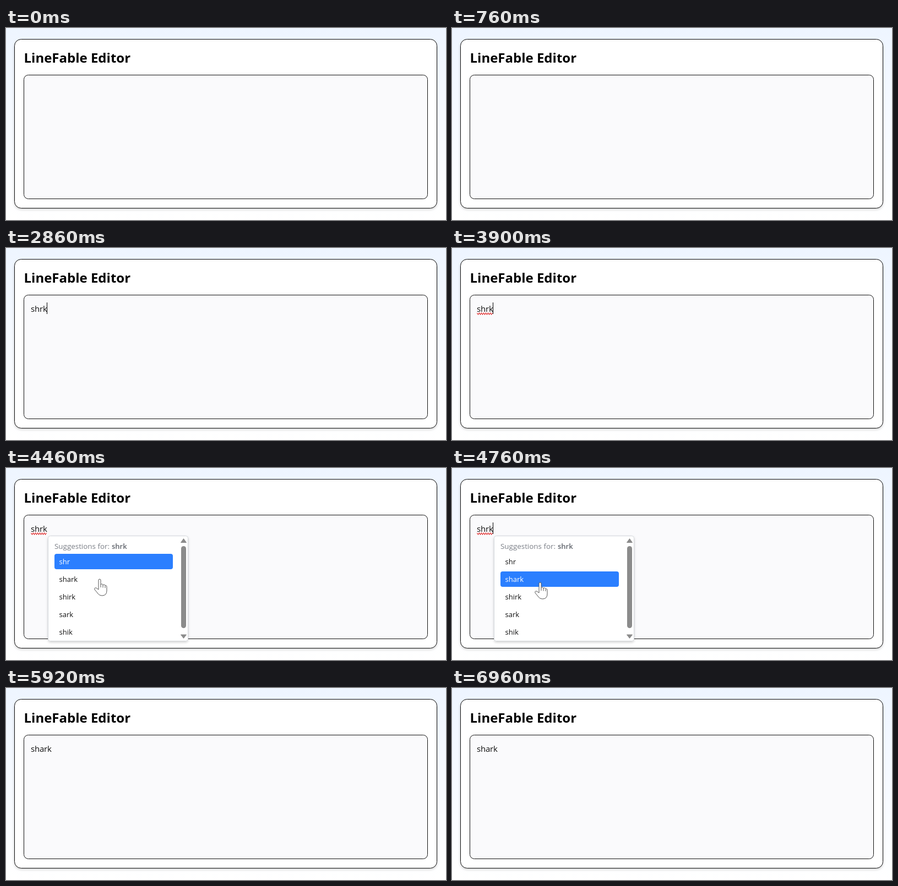
Write an HTML page that moves like this. It is 799 px wide and 349 px high and loops after 7060 ms.

```html
<!DOCTYPE html>
<html lang="en">
<head>
<meta charset="utf-8">
<title>Editor</title>
<style>
  html, body { margin: 0; width: 100%; height: 100%; overflow: hidden; background: #fff; }
  svg { display: block; width: 799px; height: 349px; font-family: "Open Sans", "Noto Sans", sans-serif; }
  .title { font-size: 24px; font-weight: 700; }
  .typed { font-size: 15px; letter-spacing: -.2px; fill: #111; }
  .head { font-size: 13.4px; fill: #7b7f87; }
  .word { font-size: 13px; font-weight: 600; fill: #62666e; }
  .item { font-size: 13px; fill: #111; }
  .cursor { fill: #fff; stroke: #222; stroke-linejoin: round; }
</style>
</head>
<body>
<svg viewBox="0 0 799 349">
  <defs>
    <linearGradient id="sky" x2="0" y2="1">
      <stop stop-color="#eef5ff"/><stop offset="1" stop-color="#fff"/>
    </linearGradient>
    <filter id="soft" x="-5%" y="-5%" width="110%" height="115%">
      <feDropShadow dx="0" dy="2" stdDeviation="2" flood-opacity=".18"/>
    </filter>
  </defs>
  <rect width="799" height="349" fill="url(#sky)"/>
  <rect x="15.5" y="20.5" width="767" height="307" rx="12" fill="#fff" stroke="#111" filter="url(#soft)"/>
  <text class="title" x="32.5" y="63">LineFable Editor</text>
  <rect x="32.5" y="85.5" width="733" height="225" rx="8" fill="#fafafc" stroke="#111"/>
  <text class="typed" id="typed" x="45" y="116"></text>
  <path id="squiggle" fill="none" stroke="#e02020" stroke-width="1.1"/>
  <rect id="caret" y="99" width="1" height="21" fill="#000"/>

  <g id="menu">
    <rect x="76.5" y="123.5" width="254" height="191" rx="4" fill="#fff" stroke="#d5d8dd" filter="url(#soft)"/>
    <text class="head" x="88" y="147">Suggestions for:</text>
    <text class="word" x="192" y="147">shrk</text>
    <rect id="pick" x="88" width="215" height="28" rx="4" fill="#2b7fff"/>
    <g id="items"></g>
    <g fill="#8b8b8b">
      <rect x="318" y="142" width="9" height="149" rx="4.5"/>
      <path d="M322.5 128.5l5 7h-10zM322.5 309.500l5-6.500h-10z" stroke="#8b8b8b" stroke-linejoin="round"/>
    </g>
  </g>

  <g id="arrow" class="cursor">
    <path d="M.5 .5V22.500L5.500 18L9 26.500L12.500 25L9 17H17Z"/>
  </g>
  <g id="beam" class="cursor">
    <path d="M-3-9H-1L0-8L1-9H3M0-8V8M-3 9H-1L0 8L1 9H3" fill="none"/>
  </g>
  <g id="hand" class="cursor">
    <path d="M-2 2Q-2 0 0 0Q2 0 2 2V10Q5 7 6 11Q9 8 10 12Q13 10.500 13 14.500V21Q13 29.500 5 30Q-1 30-4 25L-9 19Q-10 15-6 16L-2 19ZM2 10V15M6 11V15.500M10 12.500V16" stroke="#555"/>
  </g>
</svg>
<script>
const LOOP = 7060, FRAME = 95.4;
const el = id => document.getElementById(id);
const typed = el("typed"), caret = el("caret"), items = el("items"), pick = el("pick");
const show = (node, on) => node.setAttribute("visibility", on ? "visible" : "hidden");
const within = (t, a, b) => t >= a && t < b;

const labels = ["shr", "shark", "shirk", "sark", "shik"].map((word, i) => {
  const label = document.createElementNS("http://www.w3.org/2000/svg", "text");
  label.setAttribute("class", "item");
  label.setAttribute("x", 96.5);
  label.setAttribute("y", 175 + 32 * i);
  label.textContent = word;
  return items.appendChild(label);
});
el("squiggle").setAttribute("d", "M45.5 118" + "l2 3l2-3".repeat(7));

const keys = [2350, 2450, 2540, 2640];
const fixed = 5230;

// Each track: cursor shape and points of time, x, y.
const tracks = [
  ["arrow", [[1410, 262, 49], [1500, 226, 68], [1595, 216, 82]]],
  ["beam", [[1595, 206, 104], [1880, 170, 164], [2350, 170, 164]]],
  ["hand", [[4190, 192, 188], [4430, 168, 203], [4670, 164, 206], [4980, 148, 215], [fixed, 148, 215]]],
  ["beam", [[fixed, 148, 222], [5500, 176, 296]]]
];

function place(points, t) {
  const i = Math.max(1, points.findIndex(p => t < p[0]));
  const [a, b] = [points[i - 1], points[i]];
  const u = (t - a[0]) / (b[0] - a[0]);
  const k = u * u * (3 - 2 * u);
  return [a[1] + (b[1] - a[1]) * k, a[2] + (b[2] - a[2]) * k].map(Math.round);
}

function drawCursor(t) {
  for (const id of ["arrow", "beam", "hand"]) show(el(id), false);
  for (const [id, points] of tracks) {
    if (!within(t, points[0][0], points[points.length - 1][0])) continue;
    el(id).setAttribute("transform", `translate(${place(points, t)})`);
    show(el(id), true);
  }
}

function caretOn(t) {
  if (!within(t, 1900, fixed)) return false;
  const start = t < keys[0] ? 1900 : keys[3];
  return t < keys[3] || Math.floor((t - start) / 530) % 2 === 0;
}

function draw(t) {
  const count = keys.filter(k => t >= k).length;
  typed.textContent = t >= fixed ? "shark" : "shrk".slice(0, count);
  const width = count ? typed.getComputedTextLength() : 0;
  caret.setAttribute("x", Math.round(45 + width - .3));
  show(caret, caretOn(t));
  show(el("squiggle"), within(t, 3330, fixed));

  const open = within(t, 3990, fixed);
  const choice = t < 4740 ? 0 : 1;
  show(el("menu"), open);
  pick.setAttribute("y", 156 + 32 * choice);
  labels.forEach((label, i) => { label.style.fill = i === choice ? "#fff" : "#111"; });
  drawCursor(t);
}

const begin = performance.now();
function tick() {
  const t = (performance.now() - begin) % LOOP;
  draw(Math.floor((t + 22) / FRAME) * FRAME % (LOOP - 1));
  requestAnimationFrame(tick);
}
tick();
</script>
</body>
</html>
```
